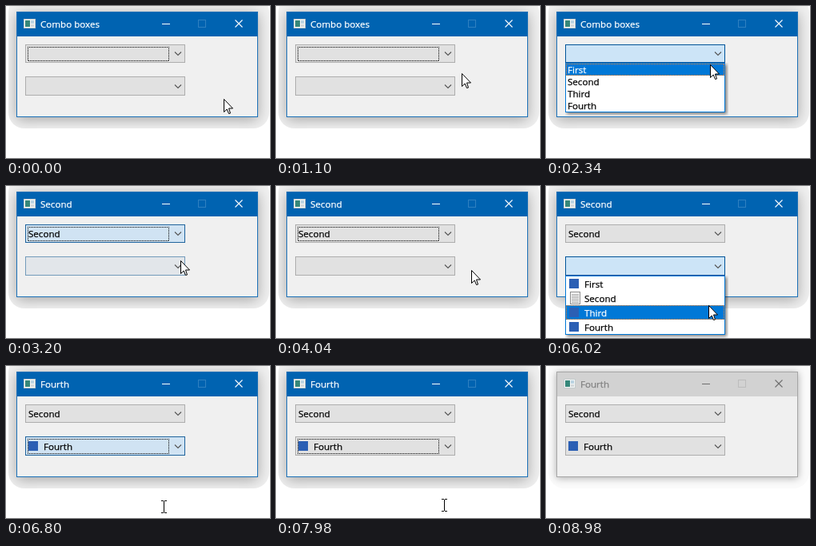
Write an HTML page with a canvas that moves like this. It is 330 px wide and 190 px high and loops after 9.08 s.

```html
<!DOCTYPE html>
<html lang="en">
<head>
<meta charset="utf-8">
<title>Combo boxes</title>
<style>
html, body { margin: 0; width: 100%; height: 100%; overflow: hidden; background: #fff; }
canvas { display: block; }
</style>
</head>
<body>
<canvas id="stage" width="330" height="190"></canvas>
<script>
const ctx = document.getElementById('stage').getContext('2d');
const ITEMS = ['First', 'Second', 'Third', 'Fourth'];
const BLUE = '#0078d7';

const LOOP = 9080;
const BEAT = 130;   // typical time between two pointer steps
const ROLL = 120;   // a list opens in two steps
const COOL = 240;   // a box fades back in three steps
const OPEN_1 = 1850, PICK_1 = 3200, OPEN_2 = 5160, PICK_2 = 6800;
const POINTER_GONE = 8400, INACTIVE = 8980;

// Pointer stops: first step, last step, position reached.
const STOPS = [
  [0, 0, 272, 116], [500, 1100, 232, 84], [1220, 1340, 215, 70], [1460, 1700, 211, 63],
  [2340, 2340, 205, 73], [2460, 2580, 202, 87], [PICK_1, 3440, 251, 105],
  [3920, 4040, 244, 105], [4160, 4640, 214, 102], [5580, 6280, 198, 173],
  [PICK_2, PICK_2, 194, 168], [6920, 7040, 196, 167], [7430, 7980, 207, 166],
  [8120, 8240, 233, 173]
];

// Progress from 0 to 1 in equal jumps, the first at start and the last at end.
function ramp(t, start, end) {
  if (t < start) return 0;
  if (t >= end) return 1;
  const steps = Math.round((end - start) / BEAT) + 1;
  return (Math.floor((t - start) / (end - start) * (steps - 1) + 1e-6) + 1) / steps;
}

function pointerAt(t) {
  let x = 0, y = 0;
  for (const [start, end, toX, toY] of STOPS) {
    const part = ramp(t, start, end);
    x += (toX - x) * part;
    y += (toY - y) * part;
  }
  return [Math.round(x), Math.round(y)];
}

const mix = (a, b, part) => a.map((c, i) => c + (b[i] - c) * part);

function shade([normal, hovered, pressed], hover, press) {
  return `rgb(${mix(mix(normal, hovered, hover), pressed, press).map(Math.round)})`;
}
const FILLS = [[225, 225, 225], [229, 241, 251], [204, 228, 247]];
const EDGES = [[173, 173, 173], [0, 120, 215], [0, 84, 153]];

function pressAt(t, open, pick) {
  return t < pick ? ramp(t, open, open + ROLL) : Math.sqrt(1 - ramp(t, pick, pick + COOL));
}

function rect(x, y, w, h, color) {
  ctx.fillStyle = color;
  ctx.fillRect(x, y, w, h);
}

function frame(x, y, w, h, color) {
  ctx.strokeStyle = color;
  ctx.lineWidth = 1;
  ctx.strokeRect(x + .5, y + .5, w - 1, h - 1);
}

// Every other pixel along the edge, as in a checkerboard.
function dottedFrame(x, y, w, h, color) {
  const right = x + w - 1, bottom = y + h - 1;
  const dot = (px, py) => (px + py) % 2 || rect(px, py, 1, 1, color);
  for (let px = x; px <= right; px++) { dot(px, y); dot(px, bottom); }
  for (let py = y; py <= bottom; py++) { dot(x, py); dot(right, py); }
}

function line(points, color, width) {
  ctx.beginPath();
  points.forEach(([x, y]) => ctx.lineTo(x, y));
  ctx.strokeStyle = color;
  ctx.lineWidth = width;
  ctx.stroke();
}

function label(text, x, y, color = '#000') {
  ctx.font = '11.6px "Open Sans", "Noto Sans", sans-serif';
  ctx.fillStyle = ctx.strokeStyle = color;
  ctx.lineWidth = .25;
  ctx.fillText(text, x, y);
  ctx.strokeText(text, x, y);
}

function setShadow(color, blur, dx, dy) {
  ctx.shadowColor = color;
  ctx.shadowBlur = blur;
  ctx.shadowOffsetX = dx;
  ctx.shadowOffsetY = dy;
}

function drawIcon(index, x, y) {
  if (index !== 1) return rect(x + 1, y + 2, 12, 12, '#2b5fb4');
  rect(x + 2, y, 13, 16, '#f8f8f8');
  frame(x + 2, y, 13, 16, '#8c8c8c');
  for (let row = 3; row < 14; row += 2) rect(x + 4, y + row, 9, 1, '#a9a9a9');
}

function drawWindow(title, active) {
  ctx.save();
  ctx.beginPath();
  ctx.roundRect(3, -12, 326, 165, 20);
  ctx.clip();
  rect(0, 0, 330, 190, active ? '#f0f0f0' : '#fafafa');
  setShadow('rgba(0,0,0,.32)', active ? 16 : 9, 0, active ? 3 : 1);
  rect(13, 7, 302, 132, '#f0f0f0');
  ctx.restore();
  rect(14, 8, 300, 30, active ? '#0063b1' : '#d2d2d2');
  frame(13, 7, 302, 132, active ? '#1a70b7' : '#a6a6a6');

  rect(22, 16, 15, 12, '#f4f6f6');
  frame(22, 16, 15, 12, '#c4cccc');
  rect(24, 18, 6, 8, '#35877a');
  rect(31, 18, 4, 4, '#b9d2e0');
  rect(31, 23, 4, 3, '#d3d8da');
  label(title, 43, 27, active ? '#fff' : '#808080');

  const ink = active ? '#fff' : '#6e6e6e';
  rect(195, 22, 10, 1, ink);
  frame(240, 17, 10, 10, active ? '#2f80c0' : '#bcbcbc');
  line([[286.5, 17.5], [295.5, 26.5]], ink, 1.1);
  line([[295.5, 17.5], [286.5, 26.5]], ink, 1.1);
}

function drawCombo(y, h, hover, press, focused, chosen, withIcon) {
  rect(24, y, 200, h, shade(FILLS, hover, press));
  frame(24, y, 200, h, shade(EDGES, hover, press));
  const mid = y + (withIcon ? 13 : 12);
  line([[211, mid - 2.5], [215, mid + 1.5], [219, mid - 2.5]], '#555', 1.1);
  if (chosen >= 0) {
    if (withIcon) drawIcon(chosen, 27, y + 4);
    label(ITEMS[chosen], withIcon ? 47 : 28, y + (withIcon ? 17 : 16));
  }
  if (focused) dottedFrame(27, y + 3, 177, h - 5, '#000');
}

// The list slides down from under its box; the row below the pointer is lit.
function drawList(y, rowHeight, opened, pointerY, withIcons) {
  const height = ITEMS.length * rowHeight + 2;
  const visible = Math.round(height * opened);
  const selected = Math.floor((pointerY - y - 1) / rowHeight);
  ctx.save();
  ctx.beginPath();
  ctx.rect(24, y, 204, visible + 4);
  ctx.clip();
  ctx.translate(0, y + visible - height);
  setShadow('rgba(0,0,0,.5)', 4, 2, 2);
  rect(24, 0, 200, height, '#fff');
  setShadow('transparent', 0, 0, 0);
  frame(24, 0, 200, height, BLUE);
  ITEMS.forEach((item, i) => {
    const top = 1 + i * rowHeight;
    const lit = i === selected;
    if (lit) {
      rect(25, top, 198, rowHeight, BLUE);
      dottedFrame(25, top, 198, rowHeight, '#ff8728');
    }
    if (withIcons) drawIcon(i, 28, top + 1);
    label(item, withIcons ? 48 : 27, top + (withIcons ? 14 : 12), lit ? '#fff' : '#000');
  });
  ctx.restore();
}

function drawArrow(x, y) {
  ctx.save();
  ctx.translate(x + .5, y + .5);
  ctx.beginPath();
  [[0, 0], [0, 16], [3.7, 12.5], [6, 18], [8, 17.5], [6, 11.5], [11, 11.5]]
    .forEach(([px, py]) => ctx.lineTo(px, py));
  ctx.closePath();
  ctx.fillStyle = '#fff';
  ctx.fill();
  ctx.strokeStyle = '#000';
  ctx.lineWidth = 1;
  ctx.stroke();
  ctx.restore();
}

function drawTextCursor(x, y) {
  rect(x + 3, y + 1, 1, 14, '#000');
  for (const edge of [y, y + 15]) {
    rect(x, edge, 3, 1, '#000');
    rect(x + 4, edge, 3, 1, '#000');
  }
}

function draw(t) {
  const first = t < PICK_1 ? -1 : 1;
  const second = t < PICK_2 ? -1 : 3;
  const active = t < INACTIVE;
  const title = ITEMS[second] || ITEMS[first] || 'Combo boxes';
  const firstFocused = t < OPEN_1 || (t >= PICK_1 && t < OPEN_2 + ROLL);
  const secondFocused = t >= PICK_2 && active;

  const hoverFirst = t < PICK_1 ? ramp(t, 1460, 1700) : 0;
  const passing = ramp(t, PICK_1, 3440) - ramp(t, 3440, 3680);
  const hoverSecond = t < PICK_2 ? passing + ramp(t, 4520, 4640) : 0;
  const [x, y] = pointerAt(t);

  rect(0, 0, 330, 190, '#fff');
  drawWindow(title, active);
  drawCombo(48, 23, hoverFirst, pressAt(t, OPEN_1, PICK_1), firstFocused, first, false);
  drawCombo(88, 24, hoverSecond, pressAt(t, OPEN_2, PICK_2), secondFocused, second, true);
  if (t >= OPEN_1 && t < PICK_1) drawList(71, 15, ramp(t, OPEN_1, OPEN_1 + ROLL), y, false);
  if (t >= OPEN_2 && t < PICK_2) drawList(112, 18, ramp(t, OPEN_2, OPEN_2 + ROLL), y, true);

  if (t < PICK_2) drawArrow(x, y);
  else if (t < POINTER_GONE) drawTextCursor(x, y);
}

const begin = performance.now();
function tick() {
  draw((performance.now() - begin) % LOOP);
  requestAnimationFrame(tick);
}
tick();
</script>
</body>
</html>
```
